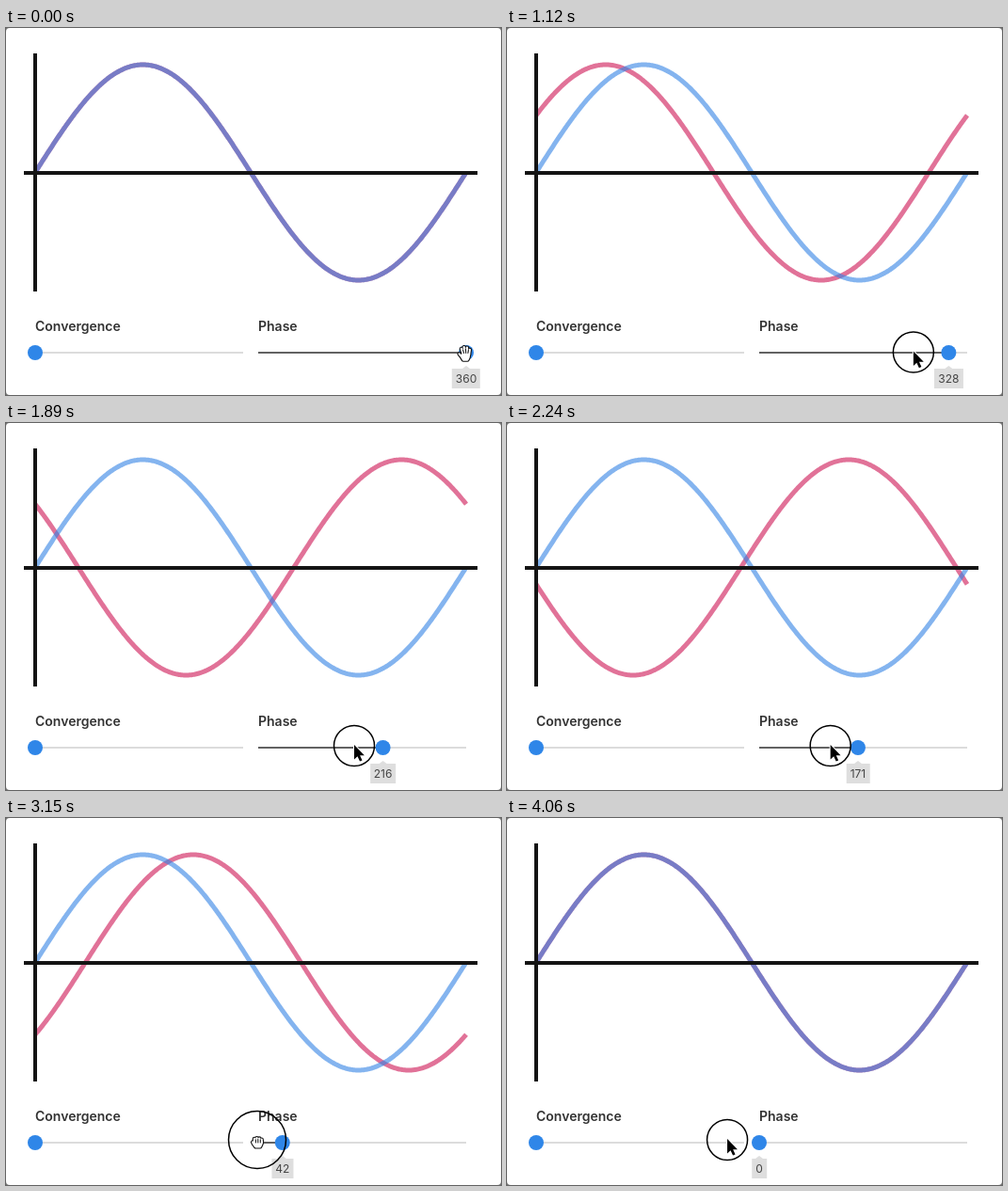
Write an HTML page with a canvas that moves like this. It is 526 px wide and 390 px high and loops after 4.13 s.

```html
<!DOCTYPE html>
<html lang="en">
<head>
<meta charset="utf-8">
<title>Wave phase</title>
<style>
html, body { margin: 0; width: 100%; height: 100%; overflow: hidden; background: #fff; }
body { position: relative; font-family: Inter, Roboto, sans-serif; }
canvas { position: absolute; left: 0; top: 0; width: 526px; height: 390px; }
.label { position: absolute; top: 308px; font-size: 14px; font-weight: 600; line-height: 18px; color: #333; }
#tip { position: absolute; top: 362px; padding: 0 4px; font-size: 12px; line-height: 21px;
  color: #444; background: #dedede; transform: translateX(-50%); white-space: nowrap; }
</style>
</head>
<body>
<div class="label" style="left:31px">Convergence</div>
<div class="label" style="left:268px">Phase</div>
<div id="tip">360</div>
<canvas id="stage"></canvas>
<script>
const W = 526, H = 390, LOOP = 4130, STEP = 70;
const canvas = document.getElementById('stage');
const tip = document.getElementById('tip');
const ctx = canvas.getContext('2d');
const ratio = window.devicePixelRatio || 1;
canvas.width = W * ratio;
canvas.height = H * ratio;

const BLUE = 'rgba(50,130,228,.6)', RED = 'rgba(206,20,84,.6)', KNOB = '#2f86e8';

// [time, value] pairs
const phaseKeys = [[0, 360], [850, 360], [1400, 276], [1890, 216], [2590, 124], [3150, 42], [3700, 0], [4130, 0]];
const xKeys = [[0, 489], [540, 489], [770, 468], [1400, 405], [1890, 370], [2590, 316], [3150, 267], [3500, 246], [3850, 235], [4130, 234]];
const yKeys = [[0, 345], [770, 345], [1400, 344], [1890, 343], [2590, 343], [3150, 342], [4130, 342]];

// Monotone cubic interpolation through the keys
function track(keys, t) {
  const slope = i => (keys[i + 1][1] - keys[i][1]) / (keys[i + 1][0] - keys[i][0]);
  const tangent = i => {
    if (i === 0 || i === keys.length - 1) return 0;
    const a = slope(i - 1), b = slope(i);
    return a * b <= 0 ? 0 : 2 * a * b / (a + b);
  };
  let i = 0;
  while (i < keys.length - 2 && t >= keys[i + 1][0]) i++;
  const [t0, v0] = keys[i], [t1, v1] = keys[i + 1];
  const d = t1 - t0, u = (t - t0) / d, u2 = u * u, u3 = u2 * u;
  return v0 * (2 * u3 - 3 * u2 + 1) + v1 * (3 * u2 - 2 * u3)
    + d * (tangent(i) * (u3 - 2 * u2 + u) + tangent(i + 1) * (u3 - u2));
}

function line(x0, y0, x1, y1, width, color) {
  ctx.beginPath();
  ctx.moveTo(x0, y0);
  ctx.lineTo(x1, y1);
  ctx.lineWidth = width;
  ctx.strokeStyle = color;
  ctx.stroke();
}

function wave(phase, color) {
  ctx.beginPath();
  for (let x = 0; x <= 458; x++) {
    ctx.lineTo(31 + x, 153.5 - 114.5 * Math.sin((x / 458 * 360 - phase) * Math.PI / 180));
  }
  ctx.lineWidth = 5;
  ctx.strokeStyle = color;
  ctx.stroke();
}

function slider(left, share) {
  const x = left + 221 * share;
  line(left, 345, left + 221, 345, 2, '#dcdcdc');
  if (share > 0) line(left, 345, x, 345, 2, '#626262');
  ctx.beginPath();
  ctx.arc(x, 345, 8, 0, 7);
  ctx.fillStyle = KNOB;
  ctx.fill();
  return x;
}

function polygon(points) {
  ctx.beginPath();
  points.forEach(([x, y]) => ctx.lineTo(x, y));
  ctx.closePath();
}

function arrow(x, y) {
  ctx.save();
  ctx.translate(x, y);
  polygon([[0, -1], [0, 14.5], [3.5, 11.2], [6, 16.6], [8.5, 15.5], [6.1, 10.3], [10.9, 10.3]]);
  ctx.lineWidth = 2;
  ctx.lineJoin = 'miter';
  ctx.strokeStyle = '#fff';
  ctx.stroke();
  ctx.fillStyle = '#000';
  ctx.fill();
  ctx.restore();
}

// White hand with a black rim: fingers are round strokes joined to a palm
function hand(x, y, fingers, palm, creases) {
  ctx.save();
  ctx.translate(x, y);
  ctx.lineCap = ctx.lineJoin = 'round';
  for (const [rim, color] of [[4.6, '#111'], [2.4, '#fff']]) {
    for (const f of fingers) line(...f, rim, color);
    polygon(palm);
    ctx.lineWidth = rim;
    ctx.strokeStyle = ctx.fillStyle = color;
    ctx.stroke();
    ctx.fill();
  }
  for (const c of creases) line(...c, 1, '#111');
  ctx.restore();
}

function openHand(x, y) {
  hand(x, y,
    [[-3.5, -4.5, -1.5, 1], [-.8, -6.2, .4, 0], [2.4, -5.8, 2.3, 0], [5.3, -3.6, 4.4, 2], [-5.8, 1, -3, 4]],
    [[-2, 1], [4.5, 1], [4, 4.5], [2.8, 7], [-1.5, 7], [-3.5, 3.5]],
    [[-1.9, -3, -1, 0], [1, -4, 1.2, 0], [3.8, -3, 3.4, 0]]);
}

function fist(x, y) {
  hand(x, y,
    [[-3, -3, -3, 1], [-.5, -3.8, -.5, 0], [2.2, -3.4, 2.2, 0], [4.6, -2.2, 4.6, 1], [-4.8, .5, -3, 3]],
    [[-3, 0], [4.6, 0], [4.3, 2.5], [3, 5.3], [-1.6, 5.3], [-4, 2]],
    [[-1.6, -2, -1.6, 1], [.8, -2.4, .8, 1], [3.3, -2, 3.3, 1]]);
}

function pointer(t) {
  const x = track(xKeys, t), y = track(yKeys, t);
  if (t < STEP) return openHand(x - 1.5, y + .5);
  const grabbing = x > 480 || (x > 252 && x < 268);
  ctx.globalAlpha = Math.min(1, t / 350);
  ctx.beginPath();
  ctx.arc(x, y, grabbing ? 30.5 : 21.5, 0, 7);
  ctx.lineWidth = 1.5;
  ctx.strokeStyle = '#000';
  ctx.stroke();
  ctx.globalAlpha = 1;
  if (grabbing) fist(x, y + 2);
  else arrow(x, y);
}

function corners() {
  ctx.beginPath();
  ctx.rect(0, 0, W, H);
  ctx.roundRect(0, 0, W, H, 4);
  ctx.fillStyle = '#777';
  ctx.fill('evenodd');
}

function draw(t) {
  const phase = Math.round(track(phaseKeys, t));
  ctx.setTransform(ratio, 0, 0, ratio, 0, 0);
  ctx.clearRect(0, 0, W, H);
  wave(phase, RED);
  wave(0, BLUE);
  line(19, 154, 501, 154, 4, '#141414');
  line(31, 27, 31, 280, 4, '#141414');
  slider(31, 0);
  const x = slider(268, phase / 360);
  polygon([[x - 4, 362], [x, 359], [x + 4, 362]]);
  ctx.fillStyle = '#dedede';
  ctx.fill();
  tip.textContent = phase;
  tip.style.left = x + 'px';
  pointer(t);
  corners();
}

const start = performance.now();
function tick() {
  const t = (performance.now() - start) % LOOP;
  draw(Math.floor(t / STEP) * STEP);
  requestAnimationFrame(tick);
}
tick();
</script>
</body>
</html>
```
